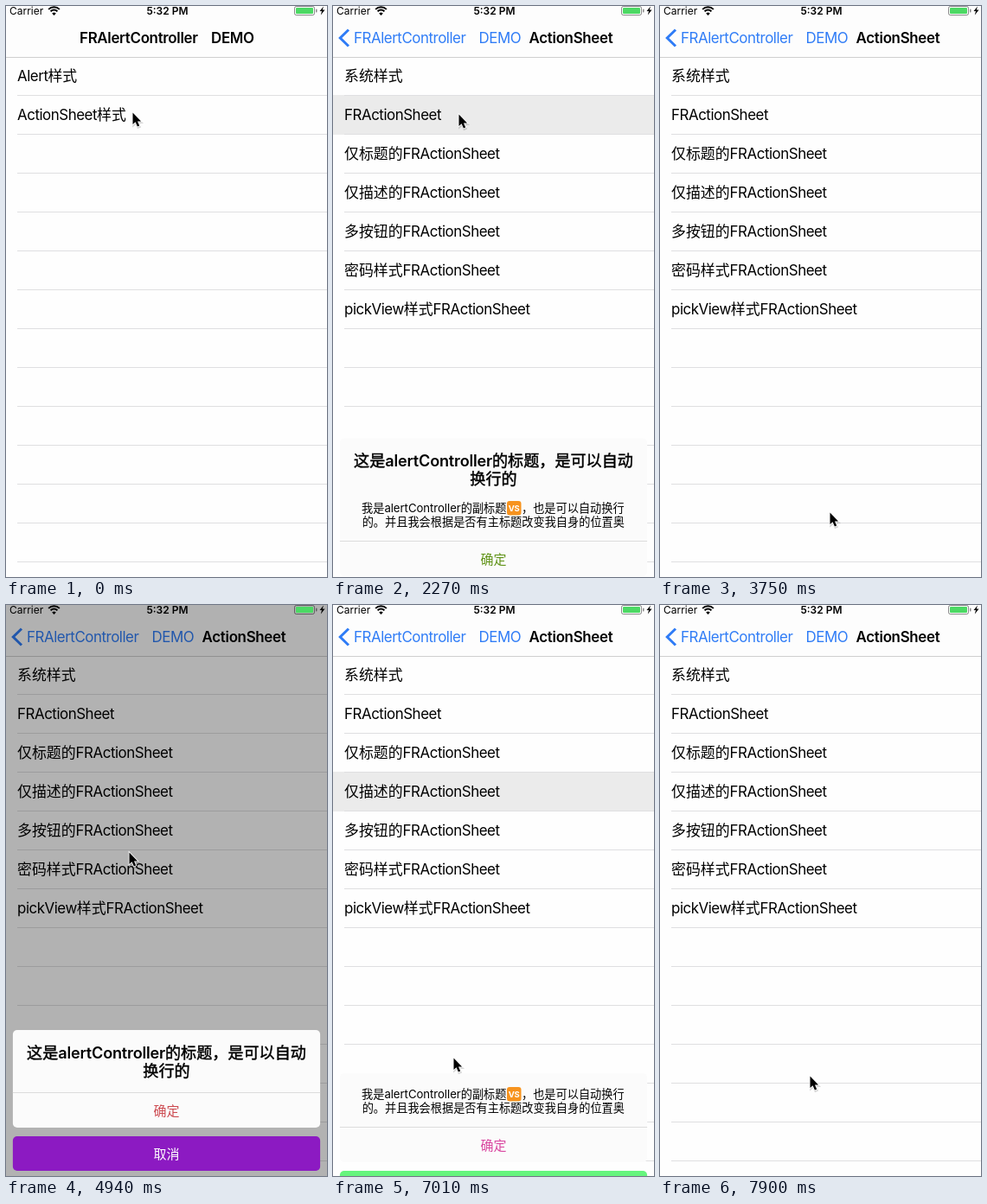
An HTML page that plays this animation: 371 by 661 pixels, repeating every 8000 ms.

```html
<!DOCTYPE html>
<html lang="zh">
<head>
<meta charset="utf-8">
<title>FRAlertController DEMO</title>
<style>
  html, body { margin: 0; width: 100%; height: 100%; overflow: hidden; background: #fff; }
  svg { display: block; width: 371px; height: 661px; }
  text { font-family: Inter, "Noto Sans CJK SC", "Noto Sans CJK", sans-serif; white-space: pre; }
  /* Medium weight for Chinese headings, semibold for the Latin runs in them */
  .heading { stroke: #000; stroke-width: .45px; }
  .heading tspan { stroke: none; font-weight: 600; }
</style>
</head>
<body>
<svg id="stage" viewBox="0 0 371 661"></svg>
<script>
const W = 371, H = 661, BLUE = '#2f7cf6';
const LOOP = 8000, FIRST = 489, TICK = 148;
const stage = document.getElementById('stage');

// Markup helpers
const rect = (x, y, w, h, fill, extra = '') =>
  `<rect x="${x}" y="${y}" width="${w}" height="${h}" fill="${fill}" ${extra}/>`;
const group = (id, body, extra = '') => `<g id="${id}" ${extra}>${body}</g>`;

// Latin runs are tracked tighter than the Chinese ones
function label(str, x, y, size, { fill = '#000', weight = 400, anchor = 'start', track = -0.027, cls = '' } = {}) {
  const runs = str.replace(/[A-Za-z]+/g, s => `<tspan letter-spacing="${track * size}">${s}</tspan>`);
  return `<text class="${cls}" x="${x}" y="${y}" font-size="${size}" font-weight="${weight}" fill="${fill}" text-anchor="${anchor}">${runs}</text>`;
}

function page(id, rows) {
  let body = rect(0, 60, W, H - 60, '#fefefe') + rect(0, 0, W, 46, '#d9d9d9', `id="${id}Pick" opacity="0"`);
  for (let y = 103; y < H; y += 45) body += rect(13, y, W - 13, 1, '#dfdfe1');
  rows.forEach((s, i) => body += label(s, 13, 87 + i * 45, 16.9));
  return group(id, body);
}

const navTitle = (x, gap, opt) =>
  label('FRAlertController', x, 43, 16.9, opt) + label('DEMO', x + gap, 43, 16.9, opt);

function statusBar() {
  const arc = r => `<path d="M${55.5 - r * 0.72} ${10 - r * 0.7}A${r} ${r} 0 0 1 ${55.5 + r * 0.72} ${10 - r * 0.7}" fill="none" stroke="#000" stroke-width="2"/>`;
  return label('Carrier', 4, 10, 12, { track: 0 }) +
    arc(8.8) + arc(5.4) + '<path d="M55.5 11L53.2 8.4Q55.5 6.6 57.8 8.4Z"/>' +
    label('5:32 PM', 186.5, 10, 12, { weight: 600, anchor: 'middle', track: 0 }) +
    rect(333.5, 0.5, 23, 10, 'none', 'rx="2" stroke="#000" stroke-opacity=".45"') +
    rect(335, 2, 20, 7, '#4cd964', 'rx="1"') +
    rect(358, 3.5, 1.5, 4, '#000', 'rx=".7" opacity=".45"') +
    '<path d="M367 0.5L362.5 6H365L363.8 10.5L368.5 4.6H365.8Z"/>';
}

const sheets = [
  { start: 11, end: 22, row: 1, top: 444.4, title: 477, note: true, ok: '#5f9216', cancel: '#cc0ae6' },
  { start: 28, end: 36, row: 2, top: 491, title: 524, close: 33, ok: '#cc4a50', cancel: '#8c1ac2' },
  { start: 43, end: 50, row: 3, top: 501, note: true, ok: '#d9459f', cancel: '#66f57e' }
];

function sheetBody(s) {
  const mid = { anchor: 'middle' };
  const heading = { anchor: 'middle', cls: 'heading', track: -0.011 };
  const left = 7.9, width = 355.2;
  let body = rect(left, s.top, width, 604 - s.top, '#fbfbfb', 'rx="5"');
  if (s.title) {
    body += label('这是alertController的标题，是可以自动', 185.5, s.title, 18.1, heading) +
      label('换行的', 185.5, s.title + 21, 18.1, heading);
  }
  if (s.note) {
    body += label('我是alertController的副标题', 33, 530, 13.2, { track: -0.004 }) +
      rect(201, 517, 16.5, 16.5, '#f7931e', 'rx="3"') +
      label('VS', 209.2, 529, 9.5, { fill: '#fff', weight: 700, anchor: 'middle' }) +
      label('，也是可以自动换行', 218, 530, 13.2) +
      label('的。并且我会根据是否有主标题改变我自身的位置奥', 185.3, 546, 13.2, mid);
  }
  return body + rect(left, 563, width, 1, '#dcdcdc') +
    label('确定', 185.5, 589.5, 15, { ...mid, fill: s.ok }) +
    rect(left, 614, width, 40, s.cancel, 'rx="5"') +
    label('取消', 185.5, 639.5, 15, { ...mid, fill: '#fff' });
}

const arrow = 'M.5 .5V14L3.6 11.2L5.9 16.4L8.2 15.4L6 10.4H10.1Z';

stage.innerHTML =
  page('root', ['Alert样式', 'ActionSheet样式']) +
  page('list', ['系统样式', 'FRActionSheet', '仅标题的FRActionSheet', '仅描述的FRActionSheet',
    '多按钮的FRActionSheet', '密码样式FRActionSheet', 'pickView样式FRActionSheet']) +
  rect(0, 0, W, 59, '#fdfdfd') + rect(0, 59, W, 1, '#cfcfcf') +
  group('rootTitle', navTitle(85, 152, { weight: 600, track: -0.018 })) +
  group('back', navTitle(24, 144.5, { fill: BLUE })) +
  `<path id="chevron" d="M18 27.5L8.3 37L18 46.5" fill="none" stroke="${BLUE}" stroke-width="3"/>` +
  group('listTitle', label('ActionSheet', 275, 43, 16.9, { weight: 600, anchor: 'middle', track: -0.018 })) +
  rect(0, 0, W, H, '#000', 'id="dim"') + statusBar() +
  sheets.map((s, i) => group('sheet' + i, sheetBody(s))).join('') +
  group('cursor',
    `<path d="${arrow}" transform="translate(.6 1.6)" fill="#000" stroke="#000" stroke-width="2" opacity=".15"/>` +
    `<path d="${arrow}" stroke="#fff" stroke-width="1.6" paint-order="stroke"/>`);

const el = id => document.getElementById(id);
const set = (id, attrs) => { for (const k in attrs) el(id).setAttribute(k, attrs[k]); };
const clamp = v => Math.min(1, Math.max(0, v));
const shift = (x, y = 0) => `translate(${x} ${y})`;

// Pointer stops: tick, x, y
const stops = [
  [0, 146, 123], [3, 147, 130], [5, 153, 171], [7, 143, 121], [9, 145, 125], [14, 145, 125],
  [17, 184, 520], [18, 190, 566], [19, 196, 586], [22, 196, 586], [26, 146, 168], [28, 146, 168],
  [30, 142, 286], [32, 165, 570], [34, 172, 580], [39, 140, 222], [42, 140, 222], [44, 139, 524],
  [46, 165, 570], [48, 180, 578], [50, 173, 545]
];

function pointer(tick) {
  const i = stops.findIndex(s => s[0] >= tick);
  if (i < 1) return stops[i < 0 ? stops.length - 1 : 0].slice(1);
  const [t0, x0, y0] = stops[i - 1], [t1, x1, y1] = stops[i];
  const u = (tick - t0) / (t1 - t0), e = u * u * (3 - 2 * u);
  return [x0 + (x1 - x0) * e, y0 + (y1 - y0) * e];
}

function pushTo(tick) {
  const p = 1 - (1 - clamp((tick - 0.4) / 3.4)) ** 3;
  set('root', { transform: shift(-0.3 * W * p) });
  set('list', { transform: shift(W * (1 - p)), visibility: p > 0 ? 'visible' : 'hidden' });
  set('rootPick', { y: 103, opacity: tick >= 0 ? 1 : 0 });
  set('rootTitle', { transform: shift(-61 * p), opacity: 1 - p });
  set('back', { transform: shift(61 * (1 - p)), opacity: p });
  set('chevron', { opacity: p });
  set('listTitle', { transform: shift(150 * (1 - p)), opacity: p });
}

function showSheets(tick) {
  let dim = 0, pick = 0, row = 0;
  sheets.forEach((s, i) => {
    const n = tick - s.start, on = n >= 0 && tick < s.end;
    set('sheet' + i, { visibility: on ? 'visible' : 'hidden' });
    if (!on) return;
    let p = 1 - Math.exp(-1.35 * n ** 1.92);
    if (s.close && tick > s.close) p *= 1 - ((tick - s.close) / (s.end - s.close)) ** 2;
    set('sheet' + i, { transform: shift(0, Math.round((1 - p) * (H - s.top))) });
    dim = 0.31 * clamp((p - 0.745) / 0.255);
    pick = clamp(1 - n / 2);
    row = s.row;
  });
  set('dim', { opacity: dim });
  set('listPick', { y: 58 + row * 45, opacity: pick });
}

// The screen refreshes once per tick
function draw(ms) {
  const tick = Math.floor((ms - FIRST) / TICK);
  pushTo(tick);
  showSheets(tick);
  set('cursor', { transform: shift(...pointer(Math.max(0, tick))) });
}

const begin = performance.now();
function frame() {
  draw((performance.now() - begin) % LOOP);
  requestAnimationFrame(frame);
}
frame();
</script>
</body>
</html>
```
